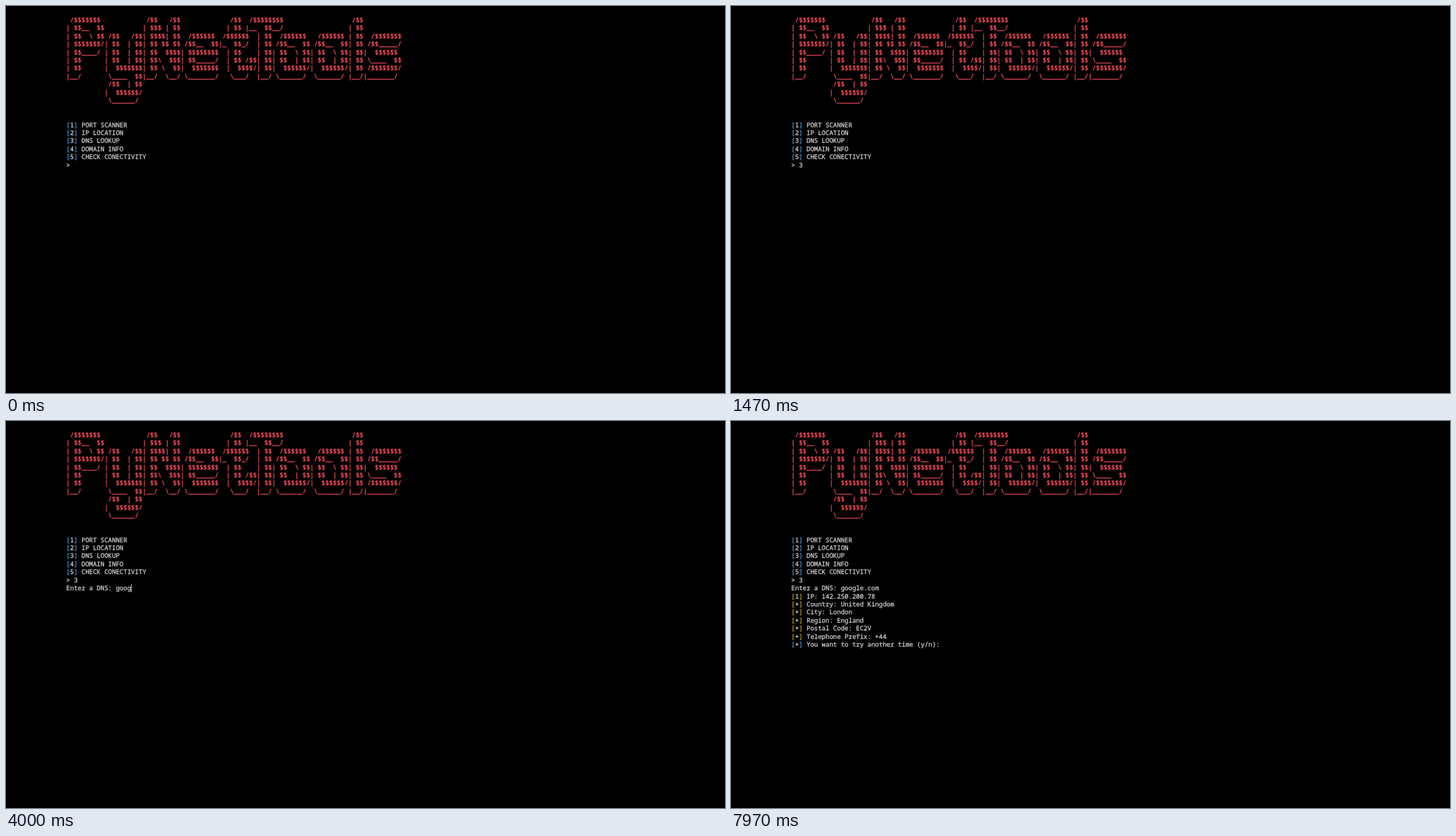
An HTML page that plays this animation: 1021x549 px, repeating every 8000 ms.

```html
<!DOCTYPE html>
<html lang="en">
<head>
<meta charset="utf-8">
<title>PyNetTools</title>
<style>
  html, body { margin: 0; width: 100%; height: 100%; overflow: hidden; background: #000; }
  svg { display: block; width: 1021px; height: 549px; background: #000; }
  text {
    font: 500 9.02px "Noto Sans Mono", "DejaVu Sans Mono", monospace;
    font-variant-ligatures: none;
    text-rendering: geometricPrecision;
    color: #d0d0d0;
    fill: currentColor;
    stroke: currentColor;
    stroke-width: 0.28px;
  }
  .art { color: #e04654; stroke-width: 0.45px; }
  .blue { color: #3a96dd; }
  .gold { color: #c19c00; }
  .caret { fill: #c4c4c4; }
</style>
</head>
<body>
<svg id="term" viewBox="0 0 1021 549"></svg>
<script>
const LOOP = 8000, LEFT = 85.6, CELL = 5.412, BASE = 22.8, LINE = 11.44;
const term = document.getElementById('term');
const timed = [];

const art = String.raw`
 /$$$$$$$            /$$   /$$             /$$  /$$$$$$$$                  /$$
| $$__  $$          | $$$ | $$            | $$ |__  $$__/                 | $$
| $$  \ $$ /$$   /$$| $$$$| $$  /$$$$$$  /$$$$$$  | $$  /$$$$$$   /$$$$$$ | $$  /$$$$$$$
| $$$$$$$/| $$  | $$| $$ $$ $$ /$$__  $$|_  $$_/  | $$ /$$__  $$ /$$__  $$| $$ /$$_____/
| $$____/ | $$  | $$| $$  $$$$| $$$$$$$$  | $$    | $$| $$  \ $$| $$  \ $$| $$|  $$$$$$
| $$      | $$  | $$| $$\  $$$| $$_____/  | $$ /$$| $$| $$  | $$| $$  | $$| $$ \____  $$
| $$      |  $$$$$$$| $$ \  $$|  $$$$$$$  |  $$$$/| $$|  $$$$$$/|  $$$$$$/| $$ /$$$$$$$/
|__/       \____  $$|__/  \__/ \_______/   \___/  |__/ \______/  \______/ |__/|_______/
           /$$  | $$
          |  $$$$$$/
           \______/`.split('\n').slice(1);

function add(tag, attrs) {
  const el = document.createElementNS('http://www.w3.org/2000/svg', tag);
  for (const key in attrs) el.setAttribute(key, attrs[key]);
  return term.appendChild(el);
}

function print(row, col, str, at = 0, cls = '') {
  const el = add('text', { x: LEFT + col * CELL, y: BASE + row * LINE, class: cls });
  el.textContent = str.replace(/ /g, '\u00a0');
  if (at) timed.push({ el, at });
}

function item(row, mark, label, cls, at) {
  print(row, 0, '[', at, cls);
  print(row, 1, mark, at);
  print(row, 2, ']', at, cls);
  print(row, 4, label, at);
}

art.forEach((str, row) => print(row, 0, str, 0, 'art'));
['PORT SCANNER', 'IP LOCATION', 'DNS LOOKUP', 'DOMAIN INFO', 'CHECK CONECTIVITY']
  .forEach((label, i) => item(13 + i, String(i + 1), label, 'blue'));

// Caret steps: [time, row, column, visible]
const caret = [[0, 18, 2, 0], [250, 18, 2, 1], [530, 18, 3, 1], [1040, 18, 3, 0], [1540, 18, 3, 1],
  [2100, 19, 13, 1], [2610, 19, 13, 0], [3110, 19, 13, 1]];

print(18, 0, '>');
print(18, 2, '3', 530);
print(19, 0, 'Enter a DNS:', 2100);

const keys = [3500, 3700, 3830, 3960, 4130, 4250, 4440, 4600, 4720, 4850];
[...'google.com'].forEach((ch, i) => {
  print(19, 13 + i, ch, keys[i]);
  caret.push([keys[i], 19, 14 + i, 1]);
});

item(20, '1', 'IP: 142.250.200.78', 'gold', 5200);
['Country: United Kingdom', 'City: London', 'Region: England', 'Postal Code: EC2V', 'Telephone Prefix: +44']
  .forEach((label, i) => item(21 + i, '+', label, 'gold', 5470));
item(26, '+', 'You want to try another time (y/n):', 'blue', 5470);

caret.push([5060, 20, 0, 1], [5200, 21, 0, 1]);
[5470, 5930, 6430, 6930, 7470, 7970].forEach((at, i) => caret.push([at, 26, 40, 1 - i % 2]));

const bar = add('rect', { class: 'caret', width: 1.1, height: LINE });

function draw() {
  const t = performance.now() % LOOP;
  for (const { el, at } of timed) el.style.display = t < at ? 'none' : '';
  const [, row, col, on] = caret.filter(step => step[0] <= t).pop();
  bar.setAttribute('x', LEFT + col * CELL - 0.1);
  bar.setAttribute('y', BASE + row * LINE - 8.8);
  bar.style.display = on ? '' : 'none';
  requestAnimationFrame(draw);
}
draw();
</script>
</body>
</html>
```
